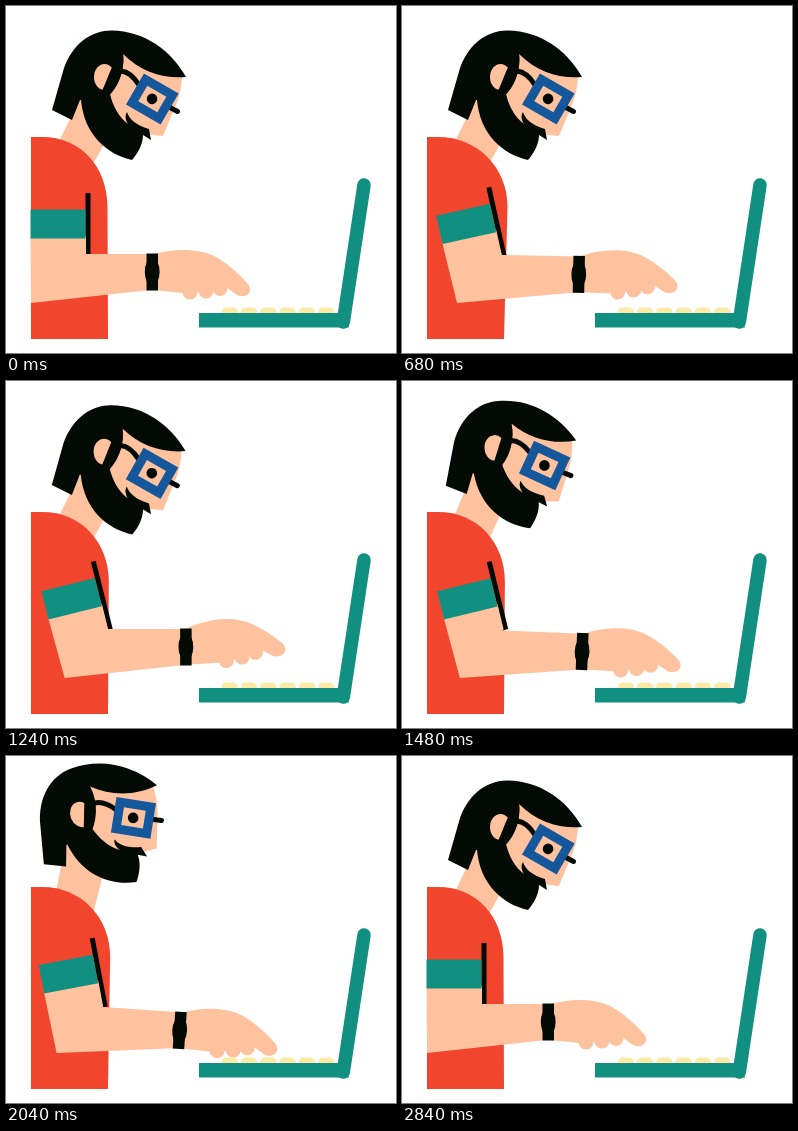
An HTML page with a canvas for the animation above (2880 ms loop, 390 by 347 pixels).

```html
<!DOCTYPE html>
<html lang="en">
<head>
<meta charset="utf-8">
<title>Typing</title>
<style>
html, body { margin: 0; width: 100%; height: 100%; overflow: hidden; background: #fff; }
canvas { display: block; }
</style>
</head>
<body>
<canvas id="stage" width="390" height="347"></canvas>
<script>
const ctx = document.getElementById('stage').getContext('2d');
const LOOP = 2880, STEP = 40;
const SKIN = '#ffc29f', INK = '#040a04', RED = '#f1452d', TEAL = '#118f80', BLUE = '#14579b', KEY = '#fdeaa6';
const NECK = [53.5, 128], SHOULDER = [58, 162], WRIST = [146, 266], ELBOW = [25, 297];

// time, upper arm, forearm and hand angles (degrees), chest bulge (px)
const poses = [
  [0, 0, 0, 0, 0],
  [320, -3.8, -4.3, -12, 1.3],
  [680, -12.5, 1.1, -3.4, 4],
  [1240, -14, 0, -9.3, 1.3],
  [1680, -12.8, 3.8, 3, 1.8],
  [2440, -7.3, 2.9, -3.4, 3],
  [2840, 0, 0, 0, 0],
  [2880, 0, 0, 0, 0]
];

const rad = deg => deg * Math.PI / 180;

function smooth(t, from, to) {
  const u = Math.min(1, Math.max(0, (t - from) / (to - from)));
  return u * u * (3 - 2 * u);
}

function turn([x, y], [px, py], deg) {
  const c = Math.cos(rad(deg)), s = Math.sin(rad(deg));
  return [px + (x - px) * c - (y - py) * s, py + (x - px) * s + (y - py) * c];
}

function slope(i, k) {
  if (i === 0 || i >= poses.length - 2) return 0;
  const p = poses[i - 1], n = poses[i + 1];
  return (n[k] - p[k]) / (n[0] - p[0]);
}

// Smooth curve through the poses
function poseAt(t) {
  let i = 0;
  while (i < poses.length - 2 && t >= poses[i + 1][0]) i++;
  const p = poses[i], n = poses[i + 1], d = n[0] - p[0], u = (t - p[0]) / d;
  const u2 = u * u, u3 = u2 * u;
  return [1, 2, 3, 4].map(k =>
    (2 * u3 - 3 * u2 + 1) * p[k] + (u3 - 2 * u2 + u) * d * slope(i, k) +
    (3 * u2 - 2 * u3) * n[k] + (u3 - u2) * d * slope(i + 1, k));
}

function fill(path, color) {
  ctx.fillStyle = color;
  ctx.fill(new Path2D(path));
}

function line(path, color, width, cap = 'butt') {
  ctx.strokeStyle = color;
  ctx.lineWidth = width;
  ctx.lineCap = cap;
  ctx.stroke(new Path2D(path));
}

function oval(x, y, rx, ry, color) {
  ctx.fillStyle = color;
  ctx.beginPath();
  ctx.ellipse(x, y, rx, ry, 0, 0, 2 * Math.PI);
  ctx.fill();
}

function rotated([x, y], deg, draw) {
  ctx.save();
  ctx.translate(x, y);
  ctx.rotate(rad(deg));
  ctx.translate(-x, -y);
  draw();
  ctx.restore();
}

function neck(angle) {
  const left = turn([75, 90], NECK, angle), right = turn([110, 117], NECK, angle);
  fill(`M${left} L${right} L87 158 L87 170 L48 170 L48 146Z`, SKIN);
}

function head(eye) {
  fill('M110 45 L176 71 Q175 86 171 96 L157 130 L120 126 L96 94Z', SKIN);
  fill('M46 104 L58 62 C68 35 88 24 106 24.5 C138 25 165 44 180 71 C158 73 135 66 117 48 ' +
    'C119 62 114 76 104 88 C107 100 112 110 122 118 C119 113 119 109 121 106 ' +
    'C123 113 130 119 143 123 L145 134 L137 129 C137 137 133 146 126 154 ' +
    'C100 148 78 128 75 94 L74 94 L66 114Z', INK);
  oval(98.5, 71, 10.5, 13, SKIN);
  fill('M117 47 C106 55 104 68 96 85 L97 95 C112 84 119 66 117 47Z', INK);
  line('M115 65 Q125 66 133 79', INK, 5);
  line('M163 101 L171.5 105.5', INK, 5, 'round');
  rotated([146.3, 93], 30, () => {
    ctx.fillStyle = SKIN;
    ctx.strokeStyle = BLUE;
    ctx.lineWidth = 9;
    ctx.fillRect(130.8, 79.5, 31, 27);
    ctx.strokeRect(130.8, 79.5, 31, 27);
    oval(146, 93, 5.3, 5.3 * eye, INK);
  });
}

function shirt(bulge) {
  const x = 101.5 + bulge;
  fill(`M25 131 L36 131 C75 131 ${x} 161 ${x} 201 L102 333 L25 333Z`, RED);
}

function laptop() {
  line('M358 179 L337.3 316', TEAL, 13.5, 'round');
  fill('M193 307 L340 307 L343 321.5 L193 321.5Z', TEAL);
  for (let i = 0; i < 6; i++) {
    const x = 215.5 + i * 19.3;
    fill(`M${x} 307 Q${x} 301.5 ${x + 5} 301.5 H${x + 11} Q${x + 16.5} 301.5 ${x + 16.5} 307Z`, KEY);
  }
}

function hand() {
  fill('M147 248.5 C165 243 192 241 210 251 C224 259 236 271 242 278 ' +
    'C248 286 240 293 231 289 L217 279 L208 285 L177 287 L147 284Z', SKIN);
  oval(184, 286, 7.5, 7.5, SKIN);
  oval(200, 285, 7.5, 7.5, SKIN);
  oval(214, 282.5, 7.5, 7.5, SKIN);
}

function watch() {
  fill('M140.5 247.5 H152 V284.5 H140.5Z', INK);
  oval(146.2, 266, 7.4, 14, INK);
}

function arm(upper, fore, palm) {
  const elbow = [turn(ELBOW, SHOULDER, upper)[0], ELBOW[1]];
  const at = (x, y) => turn([x, y], SHOULDER, upper);
  rotated(SHOULDER, upper, () => line('M82 187 V257', INK, 5));
  fill(`M${at(24.5, 230)} L${at(80, 230)} L${at(80, 256)} L${elbow}Z`, SKIN);
  rotated(SHOULDER, upper, () => fill('M24.5 203.5 H79.5 V232.5 H24.5Z', TEAL));

  ctx.save();
  ctx.translate(elbow[0] - ELBOW[0], 0);
  rotated(ELBOW, fore, () => {
    fill('M25 297 L46 248 H149 V283.5Z', SKIN);
    rotated(WRIST, palm - fore, hand);
    watch();
  });
  ctx.restore();
}

function draw(t) {
  const [upper, fore, palm, bulge] = poseAt(t);
  const nod = -22 * (smooth(t, 1160, 2160) - smooth(t, 2320, 2840));
  const eye = 1 - 0.6 * smooth(t, 2380, 2500) * (1 - smooth(t, 2500, 2620));
  ctx.fillStyle = '#fff';
  ctx.fillRect(0, 0, 390, 347);
  neck(nod);
  rotated(NECK, nod, () => head(eye));
  shirt(bulge);
  laptop();
  arm(upper, fore, palm);
}

const start = performance.now();
function frame() {
  const t = (performance.now() - start) % LOOP;
  draw(Math.floor(t / STEP) * STEP);
  requestAnimationFrame(frame);
}
frame();
</script>
</body>
</html>
```
